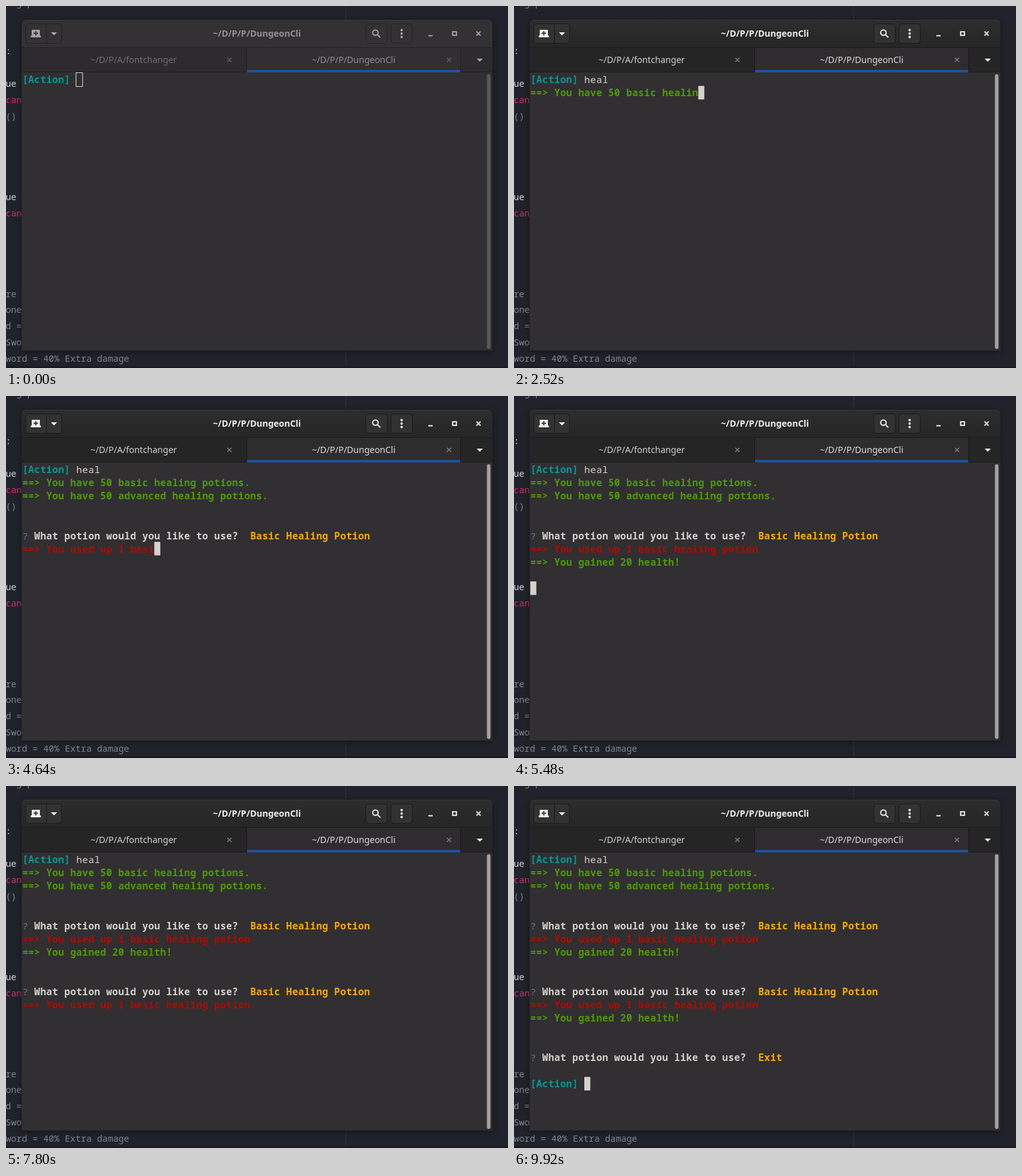
Animation, 800 px wide and 578 px high, one loop 10 s. Source, as an HTML page:

```html
<!DOCTYPE html>
<html lang="en">
<head>
<meta charset="utf-8">
<title>Terminal session</title>
<style>
  html, body { margin: 0; width: 100%; height: 100%; overflow: hidden; background: #20232b; }
  svg { display: block; width: 100vw; height: 100vh; }
  text { white-space: pre; }
  .ui { font: 14px "Noto Sans", "Open Sans", sans-serif; text-anchor: middle; }
  .bold { font-weight: 700; }
  #editor { font: 14.28px "Noto Sans Mono", "DejaVu Sans Mono", monospace; }
  #term { font-family: "Noto Sans Mono", "DejaVu Sans Mono", monospace; font-size: 15.3px; letter-spacing: .38px; }
  #frame { filter: drop-shadow(0 2px 5px rgba(0, 0, 0, .4)); }
</style>
</head>
<body>
<svg viewBox="0 0 800 578">
  <defs>
    <linearGradient id="bar" x2="0" y2="1">
      <stop stop-color="#2d2d2d"/><stop offset="1" stop-color="#262626"/>
    </linearGradient>
  </defs>
  <rect width="800" height="578" fill="#20232b"/>
  <path d="M541.5 0V578" stroke="#2d3038"/>
  <rect y="575.5" width="800" height="2.5" fill="#1d1520"/>
  <g id="editor"></g>
  <path id="frame" d="M25 550V30q0-8 8-8H767q8 0 8 8V550Z" fill="#312f31"/>
  <g id="idle"></g>
  <g id="focused"></g>
  <g id="term"></g>
</svg>
<script>
const LOOP = 10000, STEP = 40;
const CELL = 9.56, LINE = 21.06, LEFT = 26, TOP = 107;
const CHAR_MS = 15, BLINK = 600;
const FG = '#d3d2cc', GREEN = '#4e9a06', CYAN = '#06989a', RED = '#c00202', ORANGE = '#fbaa0a', MARK = '#587b9c';
const OPTIONS = ['Basic Healing Potion', 'Advanced Healing Potion', 'Exit'];

const $ = id => document.getElementById(id);
const clamp = (v, lo, hi) => Math.min(hi, Math.max(lo, v));
const esc = s => s.replace(/&/g, '&amp;').replace(/</g, '&lt;').replace(/>/g, '&gt;');
const label = (x, y, s, fill, cls = '') => `<text x="${x}" y="${y}" fill="${fill}" class="${cls}">${esc(s)}</text>`;

// Code visible behind the window: row, text, colour
function editor() {
  const white = '#d0d3d8', pink = '#c92f68', gray = '#80848b';
  return [
    [-5, 'ing p', gray], [-2, ':', white], [0, 'ue', white], [1, 'can', pink], [2, '()', gray],
    [7, 'ue', white], [8, 'can', pink], [13, 're', gray], [14, 'one', gray], [15, 'd =', gray],
    [16, 'Swo', gray], [17, 'word = 40% Extra damage', gray]
  ].map(([row, s, fill]) => label(-0.5, 129 + row * 25.82, s, fill)).join('');
}

function chrome(c) {
  const button = (x, w) =>
    `<rect x="${x + .5}" y="28.5" width="${w - 1}" height="31" rx="4.5" fill="${c.button}" stroke="${c.edge}"/>`;
  const cross = (x, y, r, color, w) =>
    `<path d="M${x - r} ${y - r}l${2 * r} ${2 * r}m0 ${-2 * r}l${-2 * r} ${2 * r}" stroke="${color}" stroke-width="${w}"/>`;
  const arrow = (x, y) => `<path d="M${x - 5} ${y}h10l-5 5Z" fill="${c.icon}"/>`;
  const dots = [38.5, 44, 49.5].map(y => `<circle cx="630.5" cy="${y}" r="1.9" fill="${c.icon}"/>`).join('');
  return `
    <path d="M25 67V30q0-8 8-8H767q8 0 8 8V67Z" fill="${c.bar}"/>
    <path d="M27 25q2-2.5 6-2.5H767q4 0 6 2.5" fill="none" stroke="${c.shine}"/>
    <rect x="25" y="67" width="750" height="39" fill="${c.tabs}"/>
    <rect x="384" y="67" width="340" height="39" fill="${c.active}"/>
    <path d="M25 66.5H775M383.5 67V106M724.5 67V106M25 105.5H384M724 105.5H775" stroke="${c.edge}"/>
    <rect x="384" y="102" width="340" height="4" fill="#1b52a0"/>
    ${button(31, 58)}<path d="M64.5 29V60" stroke="${c.edge}"/>
    ${button(573, 35)}${button(613, 35)}
    <path d="M41 38h13v9h1.5v3h-16v-3H41Z" fill="${c.icon}"/>
    <path d="M47.5 40v7M44 43.5h7" stroke="${c.button}" stroke-width="1.8"/>
    ${arrow(76.5, 42)}${arrow(755, 84)}
    <g fill="none" stroke="${c.icon}" stroke-width="2">
      <circle cx="588.7" cy="42.5" r="4.3"/><path d="M592 45.8l4.5 4.5"/>
      <path d="M673 47.5h7"/><rect x="711.8" y="41.2" width="6" height="5.6"/>
    </g>
    ${dots}${cross(753, 44, 3.3, c.icon, 1.9)}
    ${cross(356, 86, 3.3, c.close, 1.6)}${cross(706, 86, 3.3, c.close, 1.6)}
    <g class="ui">
      ${label(400, 49, '~/D/P/P/DungeonCli', c.title, 'bold')}
      ${label(203.5, 91, '~/D/P/A/fontchanger', c.tab)}
      ${label(554, 91, '~/D/P/P/DungeonCli', c.activeTab)}
    </g>
    <rect x="766.5" y="109" width="5.5" height="438.5" rx="2.7" fill="${c.thumb}"/>`;
}

const put = (row, col, s, fill, bold) =>
  label((LEFT + col * CELL).toFixed(2), (TOP + 16.3 + row * LINE).toFixed(2), s, fill, bold ? 'bold' : '');

function cursor(row, col, hollow) {
  const x = LEFT + col * CELL, y = TOP + row * LINE;
  return hollow
    ? `<rect x="${x - .5}" y="${y - .5}" width="10.5" height="22" fill="none" stroke="${FG}" stroke-width="1.1"/>`
    : `<rect x="${x}" y="${y - .5}" width="9.6" height="21.6" fill="${FG}"/>`;
}

// Lines printed one character at a time
const round = (key, row) => [
  { at: key + 30, row, text: '==> You used up 1 basic healing potion', fill: RED, next: 1 },
  { at: key + 750, row: row + 1, text: '==> You gained 20 health!', fill: GREEN, next: 2 }
];
const ENTER = 2000, PICK = [4270, 7190, 9800], PROMPT = 9880;
const printed = [
  { at: 2100, row: 1, text: '==> You have 50 basic healing potions.', fill: GREEN, next: 1 },
  { at: 2820, row: 2, text: '==> You have 50 advanced healing potions.', fill: GREEN, next: 2 },
  ...round(PICK[0], 6), ...round(PICK[1], 11)
];

// moves: times at which the pointer goes to another option
const menus = [
  { at: 3560, row: 5, end: PICK[0], moves: [], answer: 0 },
  { at: 5800, row: 10, end: PICK[1], moves: [[6440, 1], [6720, 0]], answer: 0 },
  { at: 8720, row: 15, end: PICK[2], moves: [[9000, 1], [9280, 2]], answer: 2 }
];

const FOCUS = 480, KEYS = [1600, 1680, 1720, 1800];
const blinkStarts = [FOCUS, ...KEYS, ENTER, ...PICK, PROMPT];

function menu(m, t) {
  let s = put(m.row, 0, '?', MARK) + put(m.row, 2, 'What potion would you like to use?', FG, true);
  if (t >= m.end) return s + put(m.row, 38, OPTIONS[m.answer], ORANGE, true);
  const pick = m.moves.reduce((p, [at, i]) => t >= at ? i : p, 0);
  s += put(m.row, 38, '(Use arrow keys)', FG) + put(m.row + 1 + pick, 1, '❯', ORANGE, true);
  return s + OPTIONS.map((o, i) => put(m.row + 1 + i, 3, o, FG)).join('');
}

function terminal(t) {
  const typed = KEYS.filter(k => t >= k).length;
  let out = put(0, 0, '[Action]', CYAN, true) + put(0, 9, 'heal'.slice(0, typed), FG);
  let pos = t < ENTER ? [0, 9 + typed] : [1, 0];

  for (const l of printed) {
    if (t < l.at) continue;
    const n = clamp(Math.floor((t - l.at) / CHAR_MS), 0, l.text.length);
    out += put(l.row, 0, l.text.slice(0, n), l.fill, true);
    pos = n < l.text.length ? [l.row, n] : [l.row + l.next, 0];
  }
  for (const m of menus) {
    if (t < m.at) continue;
    out += menu(m, t);
    if (t < m.end) pos = null;
    else if (m.answer === 2) pos = null;
    else if (t < m.end + 30) pos = [m.row + 1, 0];
  }
  if (t >= PROMPT) {
    out += put(17, 0, '[Action]', CYAN, true);
    pos = [17, 9];
  }

  if (t < FOCUS) return out + cursor(...pos, true);
  const since = t - Math.max(...blinkStarts.filter(k => k <= t));
  return pos && since % (2 * BLINK) < BLINK ? out + cursor(...pos) : out;
}

$('editor').innerHTML = editor();
$('idle').innerHTML = chrome({
  bar: '#333133', shine: '#3a383a', tabs: '#2d2b2d', active: '#312f31', edge: '#232123', button: '#333133',
  icon: '#a5a3a2', close: '#605e5e', title: '#929090', tab: '#706e6e', activeTab: '#908e8e', thumb: '#5b595a'
});
$('focused').innerHTML = chrome({
  bar: 'url(#bar)', shine: '#383838', tabs: '#252525', active: '#2e2c2e', edge: '#1a1a1a', button: '#323232',
  icon: '#eeeeec', close: '#7d7c7b', title: '#f0f0ee', tab: '#d2d1cf', activeTab: '#deddda', thumb: '#a3a09d'
});

const start = performance.now();
let shown = -1;

function draw() {
  const t = Math.floor(((performance.now() - start + 2) % LOOP) / STEP) * STEP;
  if (t !== shown) {
    shown = t;
    $('focused').setAttribute('opacity', clamp((t - FOCUS) / 200, 0, 1));
    $('term').innerHTML = terminal(t);
  }
  requestAnimationFrame(draw);
}
draw();
</script>
</body>
</html>
```
